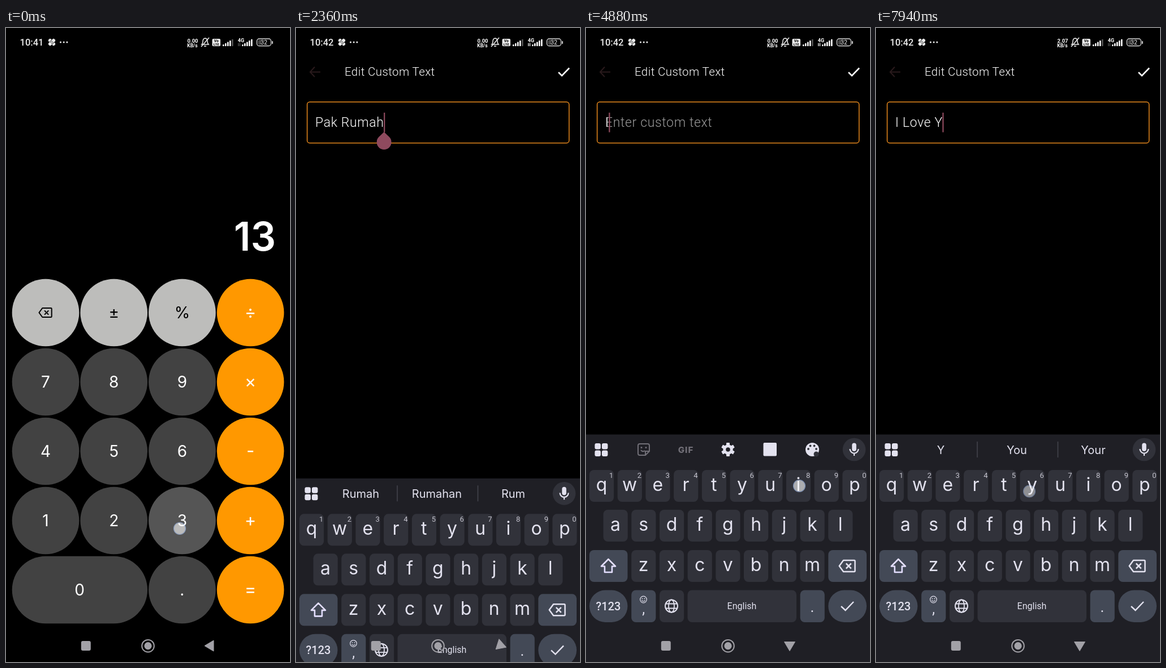
Recreate the animation shown at these times as an HTML page. Size 502x1116 px, loop 7.99 s.

```html
<!DOCTYPE html>
<html lang="en">
<head>
<meta charset="utf-8">
<title>Custom text</title>
<style>
html, body { margin: 0; width: 100%; height: 100%; overflow: hidden; background: #000; }
svg { display: block; width: 100vw; height: 100vh; }
text { white-space: pre; }
</style>
</head>
<body>
<svg id="stage" viewBox="0 0 502 1116"></svg>
<script>
const LOOP = 7990;
const LIGHT = '#e3e2ef', DIM = '#716f77', KEY = '#31323a', MOD = '#434956', PANEL = '#1f1f25', ACCENT = '#8f4a5e';
const ROBOTO = 'Roboto, sans-serif', INTER = 'Inter, sans-serif';

// Markup helpers
const text = (x, y, s, size, { fill = '#fff', font = ROBOTO, weight = 400, anchor = 'middle', more = '' } = {}) =>
  `<text x="${x}" y="${y}" font-size="${size}" fill="${fill}" font-family="${font}" font-weight="${weight}" text-anchor="${anchor}" ${more}>${s}</text>`;
const rect = (x, y, w, h, r, fill, more = '') =>
  `<rect x="${x}" y="${y}" width="${w}" height="${h}" rx="${r}" fill="${fill}" ${more}/>`;
const circle = (x, y, r, fill, more = '') => `<circle cx="${x}" cy="${y}" r="${r}" fill="${fill}" ${more}/>`;
const line = (d, stroke, width, more = '') =>
  `<path d="${d}" fill="none" stroke="${stroke}" stroke-width="${width}" ${more}/>`;
const at = (x, y, s, more = '') => `<g transform="translate(${x} ${y})" ${more}>${s}</g>`;
const group = (id, s) => `<g id="${id}">${s}</g>`;
const range = n => [...Array(n).keys()];
const eraseIcon = (color, k = 1) => `<g transform="scale(${k})">` +
  line('M-6.500 -10H12.500Q14 -10 14 -8.500V8.500Q14 10 12.500 10H-6.500L-13.800 0Z', color, 2.5, 'stroke-linejoin="round"') +
  line('M-1.800 -4.500L7.200 4.500M7.200 -4.500L-1.800 4.500', color, 2.5) + '</g>';

function statusBar() {
  const bars = x => range(5).map(i => rect(x + i * 4, 29 - i * 2.3, 2.6, 3 + i * 2.3, 0.8, i < 4 || x > 400 ? '#fff' : '#555')).join('');
  const strip = angle => `<g transform="rotate(${angle})">${rect(-7.5, -3.2, 15, 6.4, 2.2, '#eee', 'stroke="#000" stroke-width="0.8"')}</g>`;
  const holes = range(4).map(i => circle(0, -1.8, 0.8, '#000', `transform="rotate(${i * 90})"`)).join('');
  return text(24.5, 31, '', 16.5, { anchor: 'start', weight: 500, fill: '#eee', more: 'id="clock"' }) +
    at(81, 25, strip(45) + strip(-45) + holes) +
    range(3).map(i => circle(96.5 + i * 5.7, 25, 1.5, '#eee')).join('') +
    text(330, 25.5, '', 9.5, { weight: 700, more: 'id="rate"' }) + text(329.5, 33.5, 'KB/s', 8.5, { weight: 700 }) +
    at(352, 25, line('M-6 4Q-4 2 -4 -2Q-4 -6 0 -7Q4 -6 4 -2Q4 2 6 4ZM-2 7H2M-7 8L7 -8', '#eee', 1.5)) +
    rect(364.5, 19, 14.5, 13, 2, '#eee') + text(371.7, 25, 'Vo', 6.5, { fill: '#000', weight: 700 }) +
    text(371.7, 31, 'LTE', 6, { fill: '#000', weight: 700 }) +
    bars(383) + text(415.5, 24.5, '4G', 9, { weight: 700 }) + bars(417) +
    line('M410.800 26.500V32M413.500 26.500V32', '#fff', 1.3, 'id="traffic"') +
    rect(443.5, 19, 25, 12.5, 4, 'none', 'stroke="#ddd" stroke-width="1.3"') + rect(445.5, 21, 6, 8.5, 2, '#444') +
    rect(470, 23, 1.8, 5, 0.8, '#ddd') + text(456, 29, '32', 10.5);
}

function calculator() {
  const rows = ['⌫±%÷', '789×', '456-', '123+', '0 .='];
  const keys = rows.map((row, j) => [...row].map((s, i) => {
    const x = 70 + i * 120.7, y = 501 + j * 122, top = j === 0 && i < 3;
    const fill = i === 3 ? '#ff9800' : top ? '#bdbdbb' : '#424242';
    if (s === ' ') return '';
    if (s === '0') return rect(10.7, y - 59.3, 239.3, 118.6, 59.3, fill) + text(130, y + 10, s, 28, { font: INTER });
    const label = s === '⌫' ? at(x - 0.5, y, eraseIcon('#000', 0.8))
      : text(x, y + 10, s, i === 3 ? 31 : 28, { font: INTER, fill: top ? '#000' : '#fff' });
    return circle(x, y, 59.3, fill) + label;
  }).join('')).join('');
  return text(477, 392, '13', 70, { font: INTER, weight: 600, anchor: 'end' }) + keys +
    circle(311.4, 867, 59.3, '#fff', 'id="press3"') + circle(432, 989, 59.3, '#fff', 'id="pressEq"');
}

function editor() {
  const entry = { anchor: 'start', weight: 300 };
  return line('M33 68.500L25 77.500L33 86M25 77.500H43', '#2a1a1c', 2) +
    text(86, 84, 'Edit Custom Text', 20.5, { anchor: 'start', weight: 300, more: 'letter-spacing=".4"' }) +
    line('M464 78L470 84L483 70.500', '#fff', 2.6) +
    rect(19.7, 130.2, 463, 72.2, 4.5, 'none', 'id="field" stroke-width="1.5"') +
    text(34, 174, 'Enter custom text', 23, { ...entry, fill: '#a5a5a5', more: 'id="hint" letter-spacing=".64"' }) +
    text(34, 174, '', 23, { ...entry, more: 'id="entry" letter-spacing=".64"' }) +
    rect(0, 149, 2.2, 34.5, 0, ACCENT, 'id="caret"') +
    `<path id="handle" d="M0 -18L9.200 -9.200A13 13 0 1 1 -9.200 -9.200Z" fill="${ACCENT}"/>`;
}

const LETTERS = [['qwertyuiop', 6, 806], ['asdfghjkl', 30.6, 876], ['zxcvbnm', 80.2, 947]];
const eachKey = fn => LETTERS.map(([row, x, y]) => [...row].map((s, i) => fn(s, x + i * 49.7, y, i)).join('')).join('');

function toolbar() {
  const gear = circle(0, 0, 6.3, 'none', `stroke="${LIGHT}" stroke-width="5"`) +
    range(6).map(i => `<g transform="rotate(${i * 60})">${rect(-3, -12, 6, 6, 1, LIGHT)}</g>`).join('');
  const palette = circle(0, 0, 12, LIGHT) + circle(7, 8, 4.5, KEY) +
    [[-7, -1], [-3.5, -6.5], [3.5, -6.5], [7, -1]].map(([x, y]) => circle(x, y, 1.9, KEY)).join('');
  const sticker = line('M-10 -7Q-10 -10 -7 -10H7Q10 -10 10 -7V3L3 10H-7Q-10 10 -10 7ZM10 3H3V10M-5 1Q-2 5 2 2', DIM, 2) +
    circle(-4, -3.5, 1.5, DIM) + circle(4, -3.5, 1.5, DIM);
  return at(102, 742, sticker) +
    text(176.5, 747.5, 'GIF', 15, { fill: DIM, font: INTER, weight: 800, more: 'letter-spacing="1"' }) +
    at(251, 742, gear) + rect(313.5, 730, 23.5, 23.5, 2, LIGHT) + at(400, 742, palette);
}

function keyboard() {
  const arrow = 'M0 -12L12.500 0.500H6.500V11H-6.500V0.500H-12.500Z';
  const letters = upper => eachKey((s, x, y) =>
    text(x + 21.5, y + (upper ? 11.5 : 8.5), upper ? s.toUpperCase() : s, 32, { fill: LIGHT, font: INTER }));
  const grid = [[15.5, 731], [28, 731], [15.5, 743.5], [28, 743.5]].map(([x, y]) => rect(x, y, 10.5, 10.5, 3, LIGHT)).join('');
  const smile = circle(0, 0, 5.8, 'none', `stroke="${LIGHT}" stroke-width="1.2"`) +
    circle(-2, -1.5, 0.9, LIGHT) + circle(2, -1.5, 0.9, LIGHT) + line('M-3 1.500Q0 5 3 1.500', LIGHT, 1.2);
  const globe = circle(0, 0, 11, 'none', `stroke="${LIGHT}" stroke-width="2"`) +
    `<ellipse rx="5" ry="11" fill="none" stroke="${LIGHT}" stroke-width="1.8"/>` + line('M-10 -4H10M-10 4H10', LIGHT, 1.8);
  const mic = rect(-3.8, -11.5, 7.6, 14.5, 3.8, LIGHT) + line('M-7.500 -1A7.500 7.500 0 0 0 7.500 -1M0 6.500V11', LIGHT, 2.2);
  return rect(0, 715.5, 502, 810, 0, PANEL) + grid + circle(474, 742, 20.3, KEY) + at(474, 742, mic) +
    group('tools', toolbar()) +
    group('words', line('M179 728V756M321.500 728V756', '#45464e', 1.5) +
      [114.5, 249, 384].map(x => text(x, 749.5, '', 20, { fill: LIGHT, font: INTER, more: 'class="word"' })).join('')) +
    eachKey((s, x, y, i) => rect(x, y - 28, 43.2, 56, 8, KEY) +
      (y === 806 ? text(x + 38.7, 792, (i + 1) % 10, 13, { fill: '#c5c4ce' }) : '')) +
    group('lower', letters(false)) + group('upper', letters(true)) +
    rect(6, 919, 67.5, 56, 8, MOD) + at(39.5, 947, `<path id="shift" d="${arrow}" stroke="#e4dfff" stroke-width="2.6" stroke-linejoin="round"/>`) +
    rect(428.3, 919, 67.7, 56, 8, MOD) + at(461.5, 947, eraseIcon(LIGHT)) +
    rect(6, 989.5, 67.5, 56.5, 28, MOD) + text(39.5, 1024.5, '?123', 20, { fill: LIGHT, weight: 500 }) +
    rect(80.2, 989.5, 43.2, 56.5, 8, MOD) + at(101.5, 1006, smile) + text(101.8, 1031, ',', 25, { fill: LIGHT }) +
    rect(130, 989.5, 43.2, 56.5, 8, KEY) + at(151, 1017.5, globe) +
    rect(179.5, 989.5, 192.5, 56.5, 8, KEY) + text(275.5, 1023, 'English', 16, { fill: LIGHT }) +
    rect(378.6, 989.5, 43.2, 56.5, 8, MOD) + text(400, 1028, '.', 26, { fill: LIGHT }) +
    rect(428.3, 989.5, 67.7, 56.5, 28, MOD) + line('M451 1018L458.500 1025L473 1010', LIGHT, 2.4);
}

const navBar = () => rect(132.8, 1079, 17, 17, 3, '#a2a1a7') +
  circle(251, 1087.7, 10.8, 'none', 'stroke="#a2a1a7" stroke-width="2"') + circle(251, 1087.7, 6.6, '#a2a1a7') +
  at(360, 1087.5, '<path id="back" d="M-9 0L7 -9.500V9.500Z" fill="#a2a1a7" stroke="#a2a1a7" stroke-linejoin="round"/>');

document.getElementById('stage').innerHTML = rect(0, 0, 502, 1116, 0, '#000') +
  group('calc', calculator()) + group('edit', editor()) + group('board', keyboard()) +
  statusBar() + navBar() + circle(0, 0, 10.5, '#fff', 'id="touch" stroke="#a9c8ff" stroke-width="1.2"');

// Timeline
const NAME = 'Pak Rumah';
const edits = [[0, NAME]];
const hints = [[0, ['Rumah', 'Rumahan', 'Rum']]];
for (let i = 1; i <= NAME.length; i++) {
  const t = i === 1 ? 3230 : 3530 + i * 50, rest = NAME.slice(0, -i);
  edits.push([t, rest]);
  hints.push([t, rest ? ['', rest.split(' ').pop(), ''] : null]);
}
edits.push([4840, 'I'], [5250, 'I '], [6410, 'I L'], [6680, 'I Lo'], [6940, 'I Lov'], [7190, 'I Love'], [7470, 'I Love '], [7890, 'I Love Y']);
hints.push([4950, ['I', "I'm", "I'll"]], [5280, ['will', 'have', 'am']], [5780, ['Will', 'Have', 'Am']],
  [6430, ['L', 'Love', 'Like']], [6700, ['Lo', 'Love', 'Look']], [6960, ['Lov', 'Love', 'Loved']],
  [7200, ['Love', 'Loved', 'Loves']], [7490, ['you', 'it', 'the']], [7690, ['You', 'It', 'The']], [7910, ['Y', 'You', 'Your']]);
const caretStarts = [1980, 2980, ...edits.slice(1).map(e => e[0])];
const shifted = [[4500, 4840], [5780, 6410], [7680, 7890]];

// Touches: x, y, down, up, and optionally the starting point of a drag
const touches = [
  [307, 881, -100, 90], [432, 992, 600, 940], [282.5, 168, 1600, 1880], [462, 952, 3190, 4010],
  [36, 946, 4410, 4500], [377, 806, 4780, 4900], [278, 1020, 5200, 5290], [34, 946, 5700, 5770],
  [449, 878, 6040, 6420, 378, 855], [425, 812, 6620, 6700], [250, 952, 6880, 6960], [136, 812, 7120, 7200],
  [276, 1020, 7410, 7490], [36, 946, 7600, 7690], [271, 815.5, 7840, 7920]];

const $ = id => document.getElementById(id);
const set = (id, name, value) => $(id).setAttribute(name, value);
const show = (id, on) => set(id, 'display', on ? 'inline' : 'none');
const clamp = v => Math.max(0, Math.min(1, v));
const ramp = (t, a, b) => clamp((t - a) / (b - a));
const latest = (list, t) => list.reduce((found, e) => e[0] <= t ? e[1] : found, undefined);
const words = document.querySelectorAll('.word');

function drawTouch(t) {
  const hit = touches.find(([, , down, up]) => t >= down && t < up + 90);
  show('touch', !!hit);
  if (!hit) return;
  const [x, y, down, up, fromX = x, fromY = y] = hit;
  const p = ramp(t, down, down + 170);
  set('touch', 'cx', fromX + (x - fromX) * p);
  set('touch', 'cy', fromY + (y - fromY) * p);
  set('touch', 'opacity', 0.6 * (1 - ramp(t, up, up + 90)));
}

function drawEntry(t) {
  const entry = latest(edits, t);
  $('entry').textContent = entry;
  set('hint', 'opacity', t < 4840 ? ramp(t, 3980, 4150) : 1 - ramp(t, 4870, 5030));
  const focus = ramp(t, 1890, 1980);
  const mix = (a, b) => Math.round(a + (b - a) * focus);
  set('field', 'stroke', `rgb(${mix(142, 230)},${mix(140, 136)},${mix(145, 28)})`);
  const end = t < 1200 ? 0 : 34 + (entry ? $('entry').getComputedTextLength() : 0);
  show('caret', caretStarts.some(s => t >= s && t < s + 500));
  set('caret', 'x', end - 0.5);
  show('handle', t >= 1980 && t < 3230);
  set('handle', 'transform', `translate(${end} 201)`);
}

function drawBoard(t) {
  const p = 1 - (1 - ramp(t, 2190, 2595)) ** 3;
  show('board', p > 0);
  set('board', 'transform', `translate(0 ${401 * (1 - p)})`);
  set('back', 'transform', `rotate(${-90 * ramp(t, 2190, 2560)})`);
  const upper = shifted.some(([a, b]) => t >= a && t < b);
  show('upper', upper);
  show('lower', !upper);
  set('shift', 'fill', upper ? '#e4dfff' : 'none');
  const list = latest(hints, t);
  show('tools', !list);
  show('words', list);
  if (list) words.forEach((w, i) => { w.textContent = list[i]; });
}

function draw(t) {
  const leaving = t >= 1160;
  show('calc', t < 1200);
  set('calc', 'opacity', leaving ? 0.5 : 1);
  set('calc', 'transform', leaving ? 'translate(-7.500 -16.700) scale(1.030)' : '');
  set('press3', 'opacity', 0.1 * (1 - ramp(t, 90, 300)));
  set('pressEq', 'opacity', 0.15 * ramp(t, 600, 700) * (1 - ramp(t, 860, 990)));
  show('edit', t >= 1200);
  $('clock').textContent = t < 500 ? '10:41' : '10:42';
  $('rate').textContent = t < 5150 ? '0.00' : '2.07';
  set('traffic', 'opacity', t >= 2000 && t < 5150 ? 1 : 0.35);
  drawEntry(t);
  drawBoard(t);
  drawTouch(t);
}

const start = performance.now();
function tick() {
  draw((performance.now() - start) % LOOP);
  requestAnimationFrame(tick);
}
draw(0);
requestAnimationFrame(tick);
</script>
</body>
</html>
```
